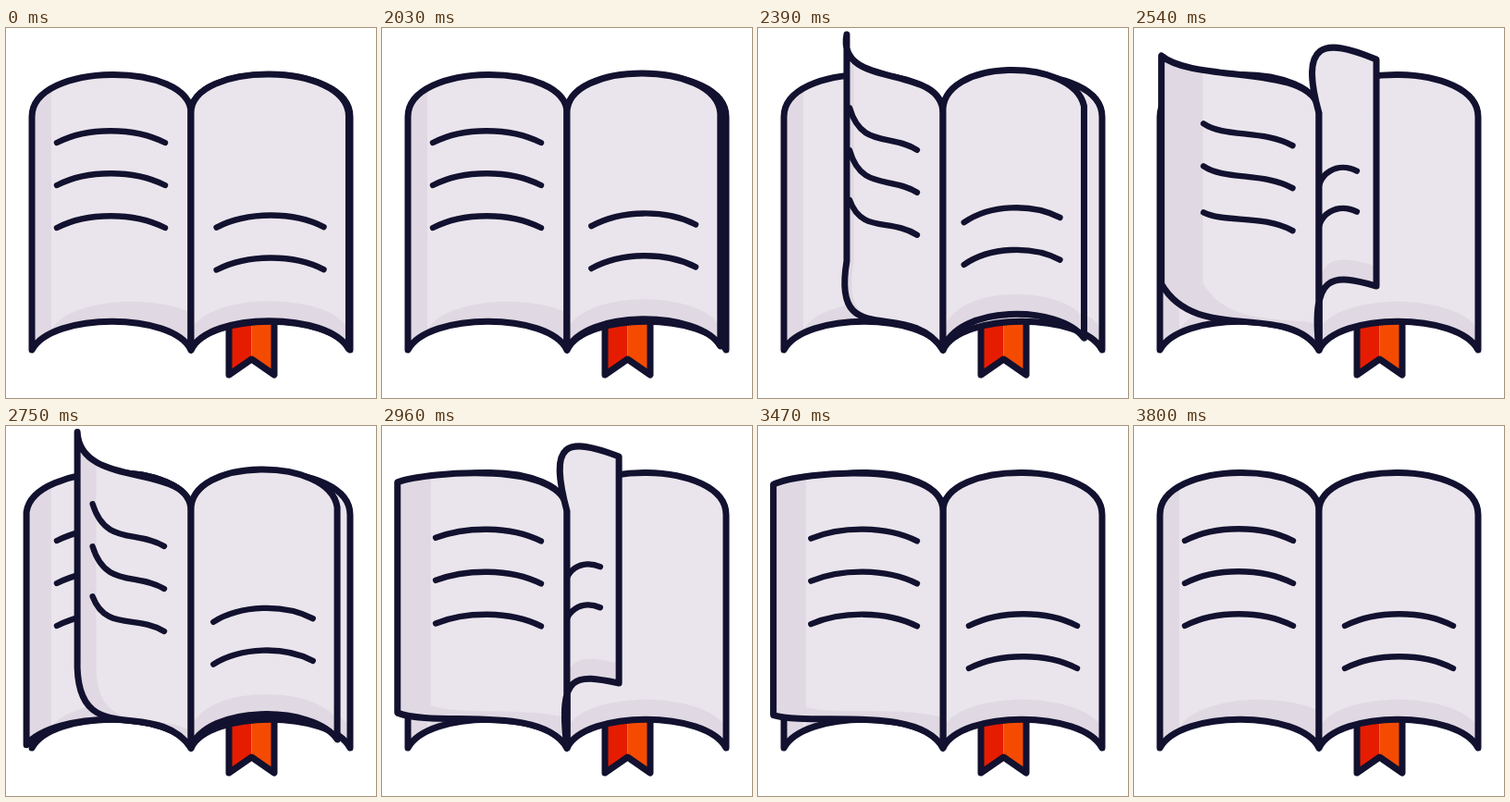
These frames come from a looping animation (400 by 400 pixels, 3830 ms). An HTML page:

```html
<!DOCTYPE html>
<html lang="en">
<head>
<meta charset="utf-8">
<title>Turning pages</title>
<style>
  html, body { margin: 0; width: 100%; height: 100%; overflow: hidden; background: #fff; }
  svg { display: block; width: 100%; height: 100%; }
  .ink { fill: none; stroke: #12112f; stroke-width: 7; stroke-linecap: round; stroke-linejoin: round; }
  .text { stroke-width: 6.4; }
</style>
</head>
<body>
<svg id="stage" viewBox="0 0 400 400">
  <path fill="#e61c00" d="M241 310H265.500V358L241 375Z"/>
  <path fill="#f54b00" d="M265.500 310H290V375L265.500 358Z"/>
  <path class="ink" d="M241 310V375L265.500 358L290 375V310Z"/>
</svg>
<script>
const LOOP = 3830, HOLD = 2030, STEP = 30;
const SPINE = 200, SPINE_TOP = 92, SPINE_BOTTOM = 348;

// Phases of one turn, in steps
const START = -2, LIFTED = 6.2, OVER = 12.2, REST = 28.5;
const TURNS = [
  { start: 0, rate: 1 },
  { start: 10.4, rate: 0.97 },
  { start: 22.75, rate: 0.8 }
];

// A pose runs outward from the spine: edge is x, top, bottom; top and bottom hold
// two curve controls; text is one cubic; rows is line gap and skew of the last line.
const flatRight = {
  edge: [372, 96, 348], top: [200, 36, 372, 36], bottom: [220, 307, 350, 307],
  text: [228, 216, 262, 199, 312, 199, 345, 216], rows: [46, 0], strip: [372]
};
const liftRight = {
  edge: [268, 35, 280], top: [178, 15, 208, 7], bottom: [192, 264, 219, 262],
  text: [200, 185, 199, 157, 225, 145, 246, 157], rows: [44, 0], strip: [268]
};
const liftLeft = {
  edge: [90, 6, 251], top: [200, 38, 80, 70], bottom: [160, 290, 74, 356],
  text: [171, 130, 141, 112, 108, 130, 94, 84], rows: [46, 1], strip: [98]
};
const mirror = (points, dy = 0) => points.map((v, i) => i % 2 ? v + dy : 2 * SPINE - v);
const flatLeft = {
  edge: [28, 96, 348], top: mirror(flatRight.top), bottom: mirror(flatRight.bottom),
  text: mirror(flatRight.text, -2 * 46), rows: [46, 0], strip: [49]
};

const clamp = v => Math.min(Math.max(v, 0), 1);
const progress = (p, from, to) => clamp((p - from) / (to - from));
const smooth = (p, from, to) => {
  const u = progress(p, from, to);
  return u * u * (3 - 2 * u);
};
const mix = (a, b, k) => a.map((v, i) => v + (b[i] - v) * k);

// Paper and its print may blend at different rates
function blend(a, b, paper, print = paper) {
  const pose = {};
  for (const part of ["edge", "top", "bottom"]) pose[part] = mix(a[part], b[part], paper);
  for (const part of ["text", "rows", "strip"]) pose[part] = mix(a[part], b[part], print);
  return pose;
}

function poseAt(phase) {
  if (phase >= REST) return { ...flatLeft, settled: 1 };
  if (phase < LIFTED) return blend(flatRight, liftRight, progress(phase, START, LIFTED) ** 2);
  if (phase < OVER) return blend(liftRight, liftLeft, progress(phase, LIFTED, OVER));
  const settled = smooth(phase, 12.7, 25.4);
  const pose = blend(liftLeft, flatLeft, settled, smooth(phase, 12.7, 21.5));
  // The free edge swings past its resting place and returns
  const t = phase - OVER;
  pose.edge[0] = flatLeft.edge[0] + 62 * Math.exp(-0.185 * t) * Math.cos(0.314 * t);
  return { ...pose, settled };
}

function add(parent, tag, attrs = {}) {
  const el = document.createElementNS("http://www.w3.org/2000/svg", tag);
  for (const name in attrs) el.setAttribute(name, attrs[name]);
  return parent.appendChild(el);
}

const stage = document.getElementById("stage");

function makePage(id) {
  const group = add(stage, "g");
  const clip = add(add(group, "clipPath", { id }), "path");
  const inside = { "clip-path": `url(#${id})` };
  const shade = add(group, "path", { fill: "#e0d9e3" });
  const light = add(group, "path", { fill: "#eae5ec", ...inside });
  const outline = add(group, "path", { class: "ink" });
  const text = add(group, "path", { class: "ink text", ...inside });
  return { group, clip, shade, light, outline, text };
}

function textPath({ text, rows: [gap, skew] }, count) {
  const [x0, y0, x1, y1, x2, y2, x3, y3] = text;
  let d = "";
  for (let i = 0; i < count; i++) {
    const dy = i * gap, drop = i === 2 ? 8 * skew : 0;
    d += `M${x0} ${y0 + dy}C${x1} ${y1 + dy} ${x2} ${y2 + dy} ${x3} ${y3 + dy + drop}`;
  }
  return d;
}

// Draws a page and returns the side its free edge is on
function drawPage(page, pose, hasText = true) {
  const [x, top, bottom] = pose.edge;
  const [ax, ay, bx, by] = pose.top;
  const [cx, cy, dx, dy] = pose.bottom;
  const isLeft = x < SPINE;
  const inset = pose.strip[0] - x;
  const lift = isLeft ? 21.5 * (pose.settled || 0) ** 2 : 21.5;
  const far = isLeft ? 280 : 150;
  const shape = `M${SPINE} ${SPINE_TOP}C${ax} ${ay} ${bx} ${by} ${x} ${top}` +
    `V${bottom}C${dx} ${dy} ${cx} ${cy} ${SPINE} ${SPINE_BOTTOM}Z`;
  const lit = `M${far} -50H${x + inset}V${bottom - lift}` +
    `C${dx + inset} ${dy - lift} ${cx + inset} ${cy - lift} ` +
    `${SPINE + inset} ${SPINE_BOTTOM - lift}H${far}Z`;
  for (const part of [page.clip, page.shade, page.outline]) part.setAttribute("d", shape);
  page.light.setAttribute("d", lit);
  page.text.setAttribute("d", hasText ? textPath(pose, isLeft ? 3 : 2) : "");
  return isLeft ? "left" : "right";
}

const leftPage = makePage("left"), rightPage = makePage("right");
const turning = TURNS.map((_, i) => makePage("turn" + i));

function render(time) {
  const t = Math.max(time % LOOP, HOLD - STEP);
  const step = Math.floor((t - HOLD) / STEP);
  const busy = { left: false, right: false };
  TURNS.forEach(({ start, rate }, i) => {
    const phase = (step - start) * rate;
    const visible = phase >= -1 && phase < REST;
    turning[i].group.style.display = visible ? "" : "none";
    if (visible) busy[drawPage(turning[i], poseAt(phase))] = true;
  });
  // A resting page is blank while another one turns above it
  drawPage(leftPage, poseAt(REST), !busy.left);
  drawPage(rightPage, poseAt(START), !busy.right);
}

const begin = performance.now();
function tick() {
  render(performance.now() - begin);
  requestAnimationFrame(tick);
}
tick();
</script>
</body>
</html>
```
